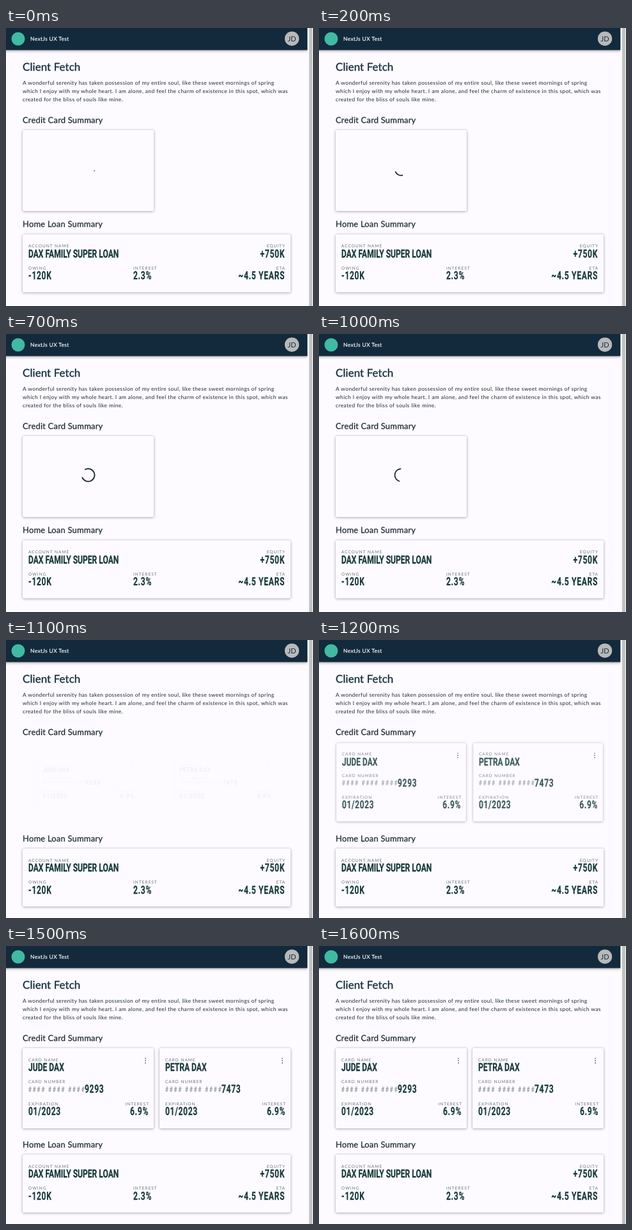
An HTML page for the animation above (4600 ms loop, 480x436 px).

```html
<!DOCTYPE html>
<html lang="en">
<head>
<meta charset="utf-8">
<title>Client Fetch</title>
<style>
  html, body { margin: 0; width: 100%; height: 100%; overflow: hidden; background: #fdfbff; }
  svg { display: block; width: 480px; height: 436px; }
  text { font-family: Lato, "Open Sans", sans-serif; fill: #1d2b33; text-rendering: geometricPrecision; white-space: pre; }
  .title { font-size: 17px; letter-spacing: .06px; fill: #122b3d; stroke: #122b3d; stroke-width: .3px; }
  .head { font-size: 13px; letter-spacing: .18px; stroke: #1d2b33; stroke-width: .25px; }
  .body { font-size: 8.5px; letter-spacing: .38px; }
  .brand { font-size: 8.5px; letter-spacing: .32px; fill: #fff; stroke: #fff; stroke-width: .15px; }
  .initials { font-size: 11px; fill: #1a2c38; text-anchor: middle; }
  .label { font-size: 6.5px; letter-spacing: 1px; fill: #6a7276; }
  .value { font-family: Roboto, "Liberation Sans", sans-serif; font-weight: 700; font-size: 17.5px; fill: #16383a; stroke: #16383a; stroke-width: .25px; }
  .figure { letter-spacing: 1px; }
  .mask { font-size: 12px; letter-spacing: 2.7px; fill: #92999c; stroke: none; }
  .end { text-anchor: end; }
  .paper { fill: #fdfbff; filter: drop-shadow(0 .5px 1px rgba(0, 0, 0, .16)) drop-shadow(0 1.5px 2.2px rgba(0, 0, 0, .28)); }
  .bar { fill: #122a3c; filter: drop-shadow(0 1px 2px rgba(0, 0, 0, .4)); }
</style>
</head>
<body>
<svg id="stage" viewBox="0 0 480 436"></svg>
<script>
const LOOP = 4600, STEP = 100, LOADED = 1100, SPIN = 1400, SPIN_LEAD = 45;
const RADIUS = 10, UNITS = 126.9;
const NARROW = 0.69;
const CARD = { w: 205, h: 126, y: 160 };

// Grow-in steps: start time, horizontal scale, opacity
const GROW = [[1100, 0.765, 0.045], [1200, 0.989, 0.82], [1300, 1, 1]];

const text = (cls, x, y, str) => `<text class="${cls}" x="${x}" y="${y}">${str}</text>`;
const label = (x, y, str, end = "") => text("label " + end, end ? x + 1 : x, y, str);
const value = (x, y, str, cls = "figure") =>
  `<text class="value ${cls}" transform="translate(${x} ${y}) scale(${NARROW} 1)">${str}</text>`;
const paper = (x, y, w, h) => `<rect class="paper" x="${x}" y="${y}" width="${w}" height="${h}" rx="2"/>`;

function creditCard(x, name, digits) {
  const left = x + 9, right = x + 197;
  const dots = [176.6, 180.1, 183.6]
    .map(y => `<circle cx="${x + 192}" cy="${y}" r="1" fill="#6f7578"/>`).join("");
  return `<g class="card" data-x="${x + CARD.w / 2}">` +
    paper(x, CARD.y, CARD.w, CARD.h) + dots +
    label(left, 180.5, "CARD NAME") + value(left, 196.3, name, "") +
    label(left, 215, "CARD NUMBER") + value(left, 228.6, "#### #### ####", "mask") +
    value(x + 97, 230.4, digits) +
    label(left, 249.5, "EXPIRATION") + value(left, 265.3, "01/2023") +
    label(right, 249.5, "INTEREST", "end") + value(right, 265.3, "6.9%", "figure end") +
    "</g>";
}

const loan = `<g id="loan">` +
  text("head", 26, 312.2, "Home Loan Summary") +
  paper(26, 323.5, 419, 91) +
  label(35, 344.2, "ACCOUNT NAME") + value(35, 359.6, "DAX FAMILY SUPER LOAN", "") +
  label(436, 344.2, "EQUITY", "end") + value(436, 359.6, "+750K", "figure end") +
  label(35, 378.6, "OWING") + value(35, 394, "-120K") +
  label(199, 378.6, "INTEREST") + value(199, 394, "2.3%") +
  label(436, 378.6, "ETA", "end") + value(436, 394, "~4.5 YEARS", "figure end") +
  "</g>";

const stage = document.getElementById("stage");
stage.innerHTML =
  `<rect width="480" height="436" fill="#fdfbff"/>` +
  `<rect class="bar" x="-5" y="-5" width="476.5" height="39.6"/>` +
  `<circle cx="19" cy="17" r="10.5" fill="#41b9a3"/>` +
  text("brand", 38, 20, "NextJs UX Test") +
  `<circle cx="447" cy="16.7" r="11.2" fill="#b7b9ba"/>` +
  text("initials", 447, 20.6, "JD") +
  `<rect x="471.5" width="8.5" height="436" fill="#f8f7f9"/>` +
  `<rect x="474" width="5" height="436" fill="#c1c1c2"/>` +
  text("title", 26, 67, "Client Fetch") +
  text("body", 26, 89, "A wonderful serenity has taken possession of my entire soul, like these sweet mornings of spring") +
  text("body", 26, 102, "which I enjoy with my whole heart. I am alone, and feel the charm of existence in this spot, which was") +
  text("body", 26, 115, "created for the bliss of souls like mine.") +
  text("head", 26, 148.6, "Credit Card Summary") +
  `<g id="loading">${paper(26, 160, 205, 127)}` +
  `<path id="arc" fill="none" stroke="#1b2a33" stroke-width="1.8"/></g>` +
  creditCard(26, "JUDE DAX", "9293") +
  creditCard(240, "PETRA DAX", "7473") +
  loan;

const loading = document.getElementById("loading");
const arc = document.getElementById("arc");
const loanGroup = document.getElementById("loan");
const cards = [...document.querySelectorAll(".card")];

const ease = x => x * x * (3 - 2 * x);
const point = a => `${128.5 + RADIUS * Math.cos(a)} ${221.3 + RADIUS * Math.sin(a)}`;

// The dash grows for half a cycle, then its tail catches up.
function drawArc(time) {
  const p = (time % SPIN) / SPIN;
  const k = ease((p * 2) % 1);
  const tail = p < 0.5 ? 15 * k : 15 + 110 * k;
  const size = p < 0.5 ? 1 + 99 * k : 100;
  const head = Math.min(tail + size, UNITS);
  const angle = u => (p + u / UNITS) * 2 * Math.PI;
  const large = head - tail > UNITS / 2 ? 1 : 0;
  arc.setAttribute("d", `M${point(angle(tail))}A${RADIUS} ${RADIUS} 0 ${large} 1 ${point(angle(head))}`);
}

function draw(time) {
  const stepped = time < 2 * STEP ? 0 : Math.floor(time / STEP) * STEP;
  const loaded = time >= LOADED;
  loading.style.display = loaded ? "none" : "";
  loanGroup.setAttribute("transform", `translate(0 ${loaded ? 3.5 : 0})`);
  if (!loaded) drawArc(stepped + SPIN_LEAD);

  const [, scale, opacity] = GROW.filter(g => g[0] <= time).pop() || [0, 1, 0];
  const cy = CARD.y + CARD.h / 2;
  for (const card of cards) {
    const cx = card.dataset.x;
    card.style.display = loaded ? "" : "none";
    card.setAttribute("opacity", opacity);
    card.setAttribute("transform",
      `translate(${cx} ${cy}) scale(${scale} ${scale * scale}) translate(${-cx} ${-cy})`);
  }
}

const start = performance.now();
function tick() {
  draw((performance.now() - start) % LOOP);
  requestAnimationFrame(tick);
}
tick();
</script>
</body>
</html>
```
